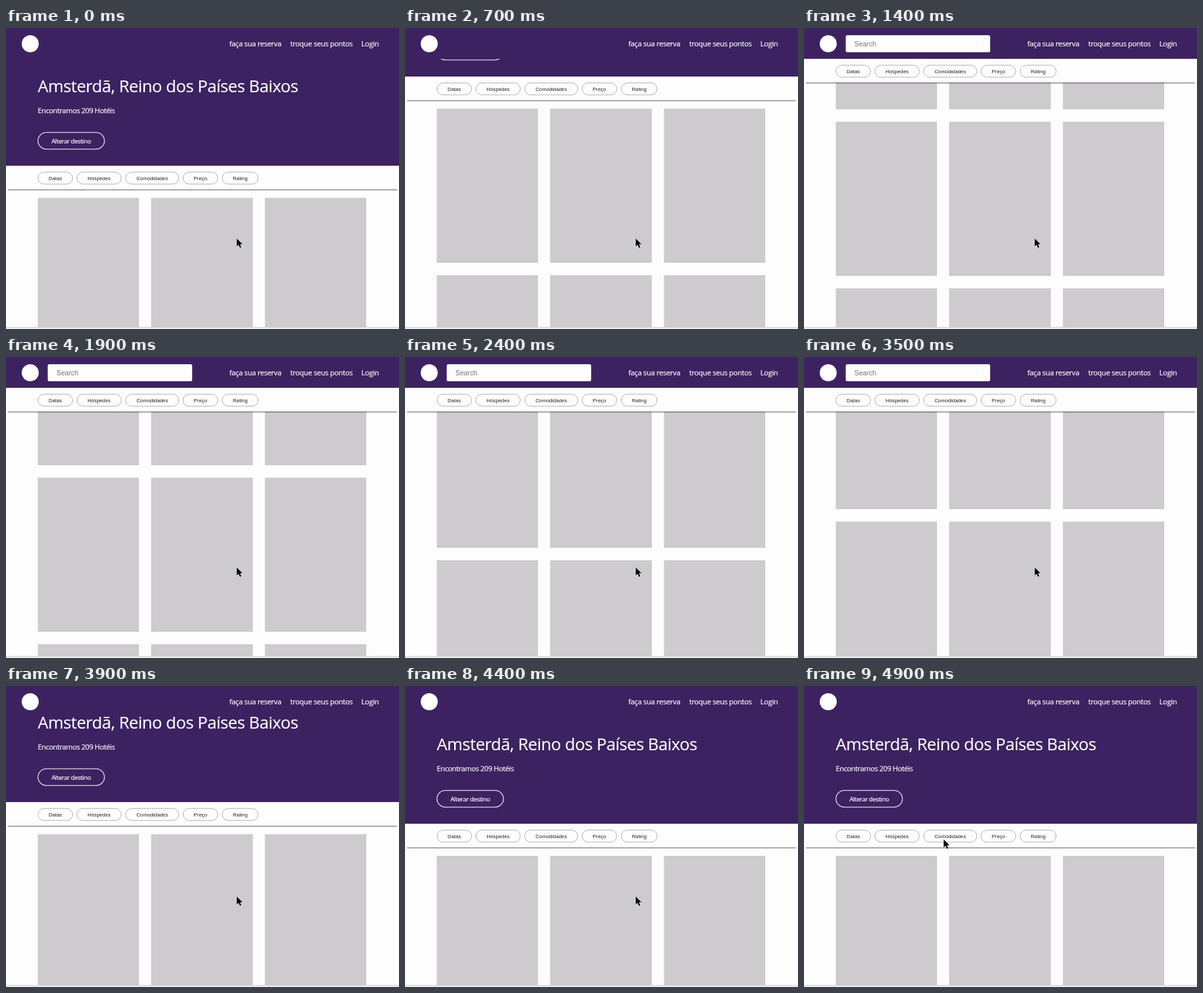
Write an HTML page that moves like this. It is 600x459 px and loops after 5 s.

```html
<!DOCTYPE html>
<html lang="pt">
<head>
<meta charset="utf-8">
<title>Hotéis</title>
<style>
  html, body { margin: 0; width: 100%; height: 100%; overflow: hidden; background: #fefdfe; }
  svg { display: block; width: 600px; height: 459px; }
  .brand { font-family: "Open Sans", "Noto Sans", sans-serif; letter-spacing: -0.025em; fill: #fff; stroke: #fff; stroke-width: .2px; }
  .plain { font-family: "Liberation Sans", Arial, sans-serif; }
</style>
</head>
<body>
<svg id="stage" viewBox="0 0 600 459" xmlns="http://www.w3.org/2000/svg">
  <defs>
    <filter id="soft" x="-5%" y="-50%" width="110%" height="200%">
      <feGaussianBlur stdDeviation="0.8"/>
    </filter>
  </defs>
  <rect width="600" height="459" fill="#fefdfe"/>
  <g id="cards" fill="#cdcbcd"></g>
  <g id="hero">
    <rect width="600" height="210" fill="#3d2261"/>
    <g class="brand">
      <text x="48.5" y="98" font-size="25.5">Amsterdã, Reino dos Países Baixos</text>
      <text x="48.5" y="130" font-size="11.1">Encontramos 209 Hotéis</text>
      <text x="99.5" y="175.5" font-size="9.6" text-anchor="middle">Alterar destino</text>
    </g>
    <rect x="48.8" y="159.3" width="101.5" height="25.4" rx="12.7" fill="none" stroke="#fff" stroke-width="1.1"/>
  </g>
  <g id="bar">
    <rect x="3" y="30" width="594" height="6.7" fill="#3c3c3c" filter="url(#soft)"/>
    <rect width="600" height="36" fill="#fefdfe"/>
    <g id="pills" class="plain" font-size="7.8" text-anchor="middle"></g>
  </g>
  <rect width="600" height="47" fill="#3d2261"/>
  <circle cx="37" cy="24" r="13" fill="#fff"/>
  <g id="search">
    <rect x="63.7" y="11" width="220.5" height="26" rx="2.5" fill="#fefdfe"/>
    <text class="plain" x="77" y="27.6" font-size="10.5" fill="#757575">Search</text>
  </g>
  <g class="brand" font-size="11.1">
    <text x="341" y="28">faça sua reserva</text>
    <text x="434" y="28">troque seus pontos</text>
    <text x="542.5" y="28">Login</text>
  </g>
  <rect y="456" width="600" height="3" fill="#f0eff0"/>
  <rect y="456" width="600" height="1" fill="#d2d1d2"/>
  <path id="cursor" d="M0 0V12.2L2.8 9.6L4.8 14.2L6.9 13.3L4.9 8.8H8.8Z" fill="#000" stroke="#fff" stroke-width="1" paint-order="stroke"/>
</svg>
<script>
const LOOP = 5000, TICK = 100;
const HERO = 210, HEADER = 47;
const $ = id => document.getElementById(id);

function add(parent, tag, attrs, text) {
  const el = document.createElementNS("http://www.w3.org/2000/svg", tag);
  for (const key in attrs) el.setAttribute(key, attrs[key]);
  if (text) el.textContent = text;
  parent.appendChild(el);
}

const columns = [[48.5, 154.5], [221.5, 155.3], [395.3, 154.7]];
for (let row = 0; row < 5; row++) {
  for (const [x, width] of columns) {
    add($("cards"), "rect", { x, y: 259 + row * 254, width, height: 235 });
  }
}

const filters = [
  ["Datas", 48.8, 101.7], ["Hóspedes", 108.2, 176], ["Comodidades", 182.7, 263.8],
  ["Preço", 270.3, 323.3], ["Rating", 330, 385]
];
for (const [label, left, right] of filters) {
  add($("pills"), "rect", {
    x: left, y: 9.8, width: right - left, height: 18.2, rx: 9.1,
    fill: "none", stroke: "#aaa6ae", "stroke-width": 0.9
  });
  add($("pills"), "text", { x: (left + right) / 2, y: 22, fill: "#222" }, label);
}

// Time and scroll offset; monotone cubic between the points.
const points = [
  [0, 0], [100, 4], [700, 136], [1400, 370], [2400, 711], [3000, 670],
  [3200, 662], [3600, 150], [3900, 33], [4100, 0], [5000, 0]
];
const rates = points.slice(1).map(([t, s], i) => (s - points[i][1]) / (t - points[i][0]));
const tangents = points.map((_, i) => {
  const a = rates[i - 1] || 0, b = rates[i] || 0;
  return a * b > 0 ? 2 * a * b / (a + b) : 0;
});

function scrollAt(t) {
  let i = 0;
  while (i < points.length - 2 && t >= points[i + 1][0]) i++;
  const [t0, s0] = points[i], [t1, s1] = points[i + 1];
  const span = t1 - t0, u = (t - t0) / span, v = 1 - u;
  return s0 * (1 + 2 * u) * v * v + s1 * (3 - 2 * u) * u * u +
    span * u * v * (tangents[i] * v - tangents[i + 1] * u);
}

function move(id, x, y) {
  $(id).setAttribute("transform", `translate(${x} ${y})`);
}

function draw(t) {
  const scroll = Math.round(scrollAt(t));
  move("cards", 0, -scroll);
  move("hero", 0, -scroll);
  move("bar", 0, Math.max(HEADER, HERO - scroll));
  $("search").setAttribute("visibility", scroll >= HERO - HEADER ? "visible" : "hidden");

  const p = Math.min(1, Math.max(0, (t - 4200) / 700)) ** 6;
  move("cursor", 352.3 - 139 * p, 321 - 87 * p);
}

function loop() {
  const t = performance.now() % LOOP;
  draw(Math.floor(t / TICK) * TICK);
  requestAnimationFrame(loop);
}
loop();
</script>
</body>
</html>
```
